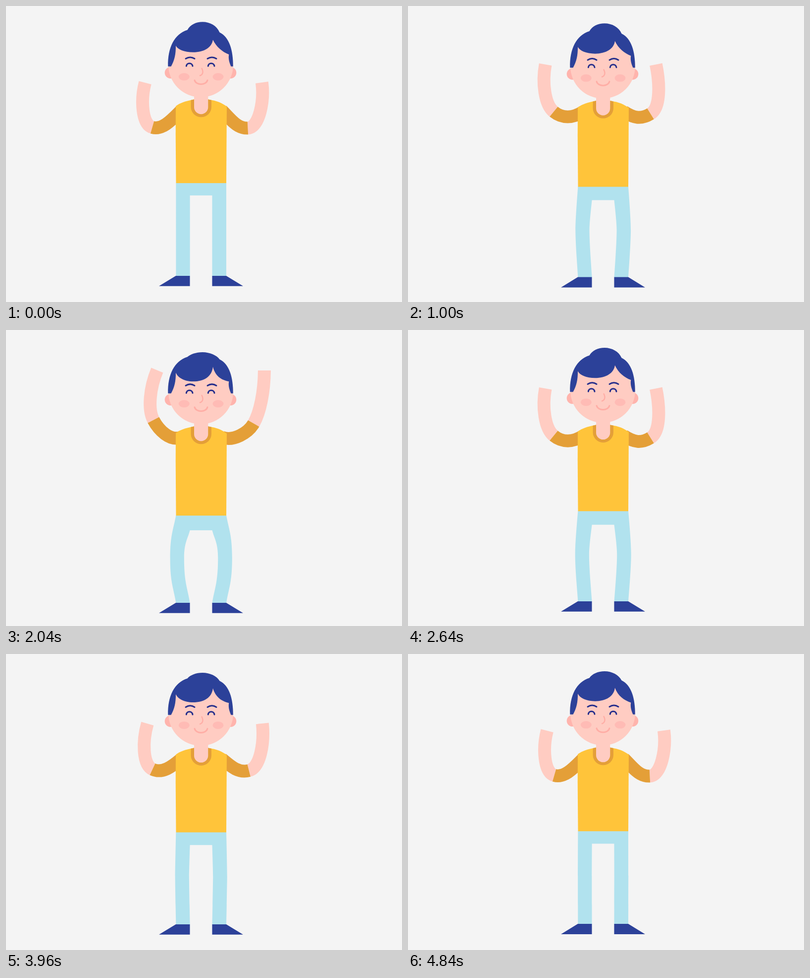
An HTML page for the animation above (4.88 s loop, 800 by 600 pixels).

```html
<!DOCTYPE html>
<html lang="en">
<head>
<meta charset="utf-8">
<title>Dancing figure</title>
<style>
html, body { margin: 0; width: 100%; height: 100%; overflow: hidden; background: #f4f4f4; }
svg { display: block; width: 100vw; height: 100vh; }
</style>
</head>
<body>
<svg viewBox="0 0 800 600">
  <rect width="800" height="600" fill="#f4f4f4"/>
  <path id="pants" fill="#b1e2ee"/>
  <g fill="none" stroke-width="26">
    <path id="foreL" stroke="#ffccc2"/>
    <path id="foreR" stroke="#ffccc2"/>
    <path id="sleeveL" stroke="#e49f38"/>
    <path id="sleeveR" stroke="#e49f38"/>
  </g>
  <path id="shirt" fill="#ffc43a"/>
  <g id="upper">
    <path fill="#e49f38" d="M373.5 190.8L394 186L415 190.8V204.5A20.75 20.75 0 0 1 373.5 204.5Z"/>
    <path fill="#ffccc2" d="M380 165H408.3V205A14.15 14.15 0 0 1 380 205Z"/>
    <circle cx="332.3" cy="135.3" r="11.6" fill="#ffb4ad"/>
    <circle cx="453.7" cy="135.3" r="11.6" fill="#ffb4ad"/>
    <circle cx="393.5" cy="119.5" r="65.5" fill="#ffccc2"/>
    <ellipse cx="359.8" cy="143.5" rx="11" ry="7.5" fill="#ffbbb5"/>
    <ellipse cx="428.5" cy="143.5" rx="11" ry="7.5" fill="#ffbbb5"/>
    <g fill="none" stroke-linecap="round" stroke-width="3">
      <g stroke="#262f8c">
        <path d="M363 106.8Q372 101 381 106.8M407 106.8Q416 101 425 106.8"/>
        <path d="M364.3 121.8C365 114.3 376 114.3 377 121.8M408.3 121.8C409 114.3 420 114.3 421 121.8"/>
      </g>
      <g stroke="#ffaea6">
        <path stroke-width="2.4" d="M395.5 126.5C399 133 398 139 392 141"/>
        <path d="M381 150.5C384 161.3 404 161.3 407 150.5"/>
      </g>
    </g>
    <path id="hair" fill="#2c4199"/>
  </g>
  <path id="feet" fill="#2c4199" d="M343 547H371.5V567.8H309ZM416.5 547H445L479 567.8H416.5Z"/>
</svg>
<script>
const el = {};
document.querySelectorAll('[id]').forEach(n => el[n.id] = n);
const set = (id, d) => el[id].setAttribute('d', d);

const STEP = 40, FRAMES = 122, BEAT = FRAMES / 6, HAIR_LAG = 3;

// Each joint: rest place, shift when raised, sideways share of the sway
const arms = {
  L: { out: -1, shoulder: 354, bend: 16, flex: 46, tip: 104.5,
    elbow: { at: [295.5, 246], lift: [0, -63.5], sway: 2.3 },
    hand: { at: [281, 155.5], lift: [8.7, -74], sway: 15.6 } },
  R: { out: 1, shoulder: 436, bend: 3, flex: 57, tip: 97.5,
    elbow: { at: [488.5, 247.5], lift: [7.4, -58], sway: 4.4 },
    hand: { at: [517, 155], lift: [-13.5, -73], sway: 18.5 } }
};

// Cubic ease (.4, 0, .6, 1)
function ease(x) {
  let lo = 0, hi = 1;
  for (let i = 0; i < 24; i++) {
    const m = (lo + hi) / 2, n = 1 - m;
    if (1.2 * n * n * m + 1.8 * n * m * m + m * m * m < x) lo = m; else hi = m;
  }
  return lo * lo * (3 - 2 * lo);
}

// Down and up once per beat: 0 standing, 1 deepest
function squat(f) {
  const u = Math.max(f, 0) % BEAT / BEAT;
  return ease(1 - Math.abs(1 - 2 * u));
}

// Arms rise and fall in ten steps on whole-step beats, swaying right and left in turn
function raise(f) {
  const beat = n => Math.min(Math.round(n * BEAT), FRAMES - 1);
  let n = 0;
  while (n < 5 && f >= beat(n + 1)) n++;
  return { s: ease(Math.min(f - beat(n), beat(n + 1) - f, 10) / 10), way: n % 2 ? -1 : 1 };
}

function drawArm(side, s, way, drop) {
  const { out, shoulder, bend, flex, tip, elbow, hand } = arms[side];
  const joint = j => [j.at[0] + s * (j.lift[0] + way * j.sway), j.at[1] + s * j.lift[1]];
  // Step from p at an angle above the outward direction
  const go = (p, deg, len) => {
    const a = deg * Math.PI / 180;
    return [p[0] + out * len * Math.cos(a), p[1] - len * Math.sin(a)];
  };
  const S = [shoulder, 211.5 + drop], E = joint(elbow), H = joint(hand);
  const aim = bend + flex * s, len = Math.hypot(H[0] - E[0], H[1] - E[1]);
  set('sleeve' + side, `M${S}C${[go(S, 24 * s - 45, 25), go(E, aim, -22), E]}`);
  set('fore' + side, `M${E}C${[go(E, aim, len * 0.24), go(H, tip - 8 * out * way * s, len * -0.39), H]}`);
}

function drawPants(s, hem) {
  const crotch = 384 + 22 * s, foot = 547.5 + 6 * s, knee = 449 + 13 * s, w = 11.8 * s;
  // Leg edge from (x, y) over the knee to the foot, bowed towards dir
  const edge = (x, y, dir) => {
    const kx = x + dir * w, mid = x + dir * w * 0.42;
    const up = knee - y, low = foot - knee, k = 0.55 * s;
    return [[x, y], [mid, y + up / 3], [kx, knee - up * k], [kx, knee],
      [kx, knee + low * k], [mid, foot - low / 3], [x, foot]];
  };
  const line = e => `${e[0]}C${e.slice(1)}`;
  set('pants', `M${line(edge(343.4, hem - 1, -1))}L${line(edge(371.6, crotch, -1).reverse())}` +
    `L${line(edge(416.5, crotch, 1))}L${line(edge(445, hem - 1, 1).reverse())}Z`);
}

function drawHair(b) {
  const top = 32.3 + 8 * b, side = 38 + 6.5 * b, dip = 5.5 * b, low = 93.8 + dip;
  set('hair', `M327.3 122.5C326.5 84 340 57 366.5 48.5C372 ${side} 384 ${top} 397 ${top}` +
    `C412 ${top} 426 ${side + 2} 431.5 53.5C451 63 459 89 458.8 122.5H454.5` +
    `C450.5 113 449 106 450.3 98.3C${437 - dip / 2} ${93 + dip / 2} ${425 - dip / 2} ${83 + dip} 418 68.5` +
    `C416 ${84 + dip} 400 ${low} 378 ${low}C360 ${low} 347 ${88 + dip / 2} 343 80.5` +
    `C343.3 98 340 111 333.5 122.5Z`);
}

function draw(f) {
  const s = squat(f), drop = 6 * s, hem = 359 + 17.2 * s;
  const { s: r, way } = raise(f);
  drawArm('L', r, way, drop);
  drawArm('R', r, way, drop);
  drawPants(s, hem);
  const y = v => v + drop;
  set('shirt', `M343 ${y(203)}C352 ${y(196)} 364 ${y(192.5)} 379 ${y(189.8)}H410` +
    `C425 ${y(192)} 437 ${y(196.5)} 446 ${y(204)}L445 ${hem}H343.5L342.7 ${y(260)}Z`);
  drawHair(squat(f - HAIR_LAG));
  for (const part of [el.upper, el.feet]) part.setAttribute('transform', `translate(0 ${drop})`);
}

const start = performance.now();
function tick() {
  draw(Math.floor((performance.now() - start) / STEP) % FRAMES);
  requestAnimationFrame(tick);
}
tick();
</script>
</body>
</html>
```
